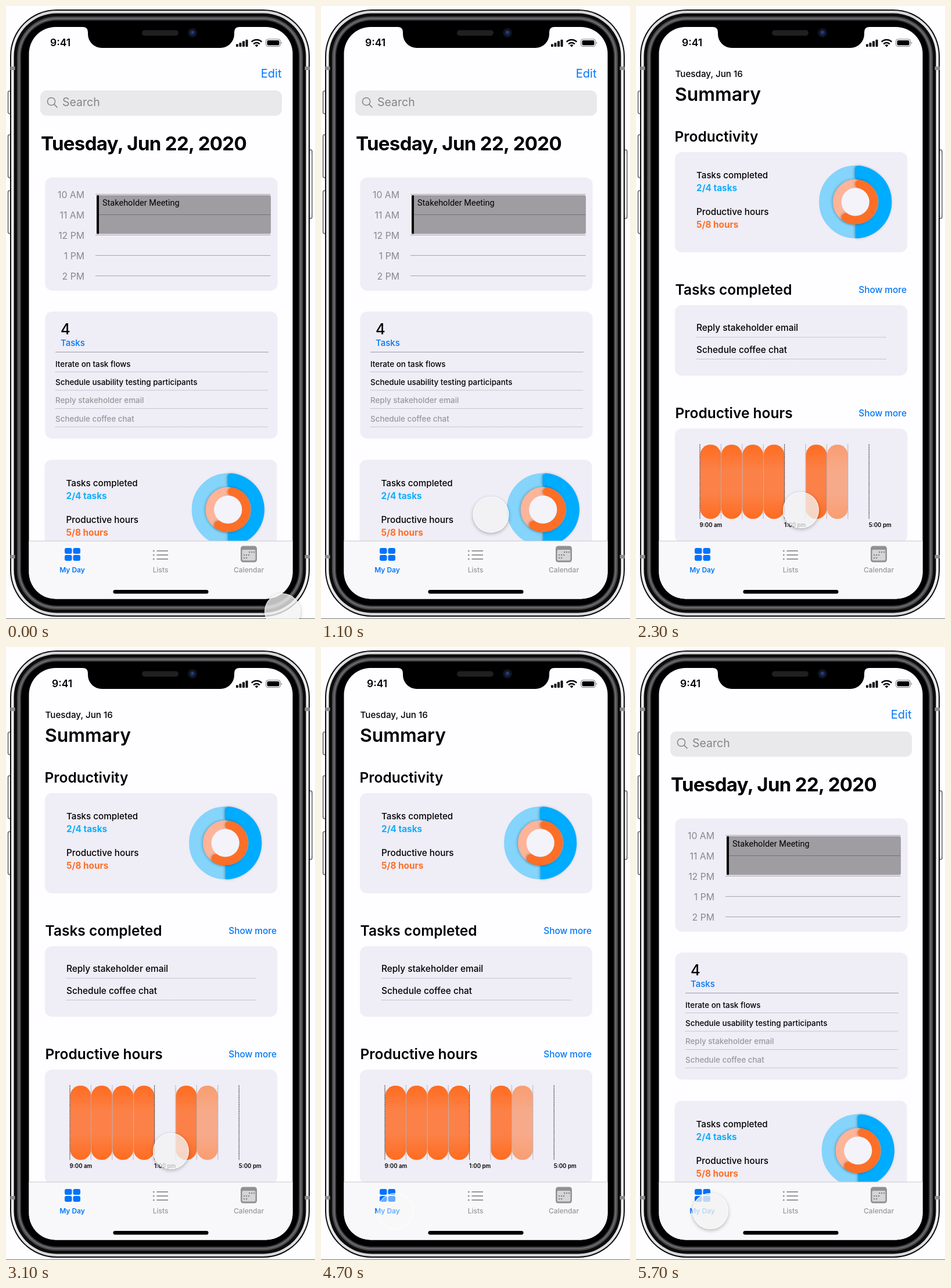
An HTML page for the animation above (5800 ms loop, 532x1053 px).

```html
<!DOCTYPE html>
<html lang="en">
<head>
<meta charset="utf-8">
<title>My Day</title>
<style>
  html, body { margin: 0; width: 100%; height: 100%; overflow: hidden; background: #fefdff; }
  svg { display: block; position: absolute; left: 0; top: 0; }
  text { font-family: Inter, sans-serif; white-space: pre; }
  .raised { filter: drop-shadow(-1px 0 2px rgba(0, 0, 0, .28)); }
  #touch {
    position: absolute; left: -31px; top: -31px; width: 62px; height: 62px;
    box-sizing: border-box; border: 1.5px solid rgba(255, 255, 255, .8); border-radius: 50%;
  }
</style>
</head>
<body>
<svg id="stage" width="532" height="1053" viewBox="0 0 532 1053"></svg>
<div id="touch"></div>
<script>
const BLUE = '#0077f8', GREY = '#98989b', CARD = '#efedf6', SKY = '#12aefb', ORANGE = '#fd6f27';

const text = (x, y, str, size, weight = 500, fill = '#000', anchor = 'start', extra = '') =>
  `<text x="${x}" y="${y}" font-size="${size}" font-weight="${weight}" fill="${fill}" text-anchor="${anchor}" ${extra}>${str}</text>`;
const rect = (x, y, w, h, r, fill, extra = '') =>
  `<rect x="${x}" y="${y}" width="${w}" height="${h}" rx="${r}" fill="${fill}" ${extra}/>`;
const line = (x1, y1, x2, y2, stroke, width = 1, dash = 'none') =>
  `<path d="M${x1} ${y1}L${x2} ${y2}" stroke="${stroke}" stroke-width="${width}" stroke-dasharray="${dash}"/>`;
const circle = (x, y, r, fill, extra = '') =>
  `<circle cx="${x}" cy="${y}" r="${r}" fill="${fill}" ${extra}/>`;
const repeat = (items, draw) => items.map(draw).join('');
const dotted = (x1, x2, y) => line(x1, y, x2, y, '#a3a2a8', 1, '1.2 1');

// Phone body: nested rounded outlines, from the steel rim to the black bezel
const ring = (inset, fill) =>
  rect(7 + inset, 6 + inset, 516 - 2 * inset, 1043 - 2 * inset, 80 - inset, fill);
const sideButton = (x, y, h) => rect(x, y, 6, h, 2, 'url(#steel)', 'stroke="#222" stroke-width="1"');

const phone = `
  ${line(0, 1052.5, 532, 1052.5, '#777')}
  ${sideButton(3.5, 146, 39)}${sideButton(3.5, 221, 74)}${sideButton(3.5, 317, 74)}${sideButton(521, 247, 118)}
  ${ring(0, '#0c0c0d')}${ring(2, 'url(#steel)')}${ring(6.5, '#0c0c0d')}
  ${ring(12, '#4a4a4d')}${ring(14.5, '#6a6a6e')}${ring(17, '#3a3a3c')}${ring(19, '#000')}
  ${repeat([104, 943], y => rect(7.5, y, 8, 6, 0, '#8f8f92') + rect(514.5, y, 8, 6, 0, '#8f8f92'))}`;

const statusIcons = `
  ${repeat([0, 1, 2, 3], i => rect(396 + i * 5.5, 65.5 - i * 2.6, 4, 4.5 + i * 2.6, 1, '#000'))}
  <g fill="none" stroke="#000" stroke-width="2.6">
    <path d="M422.8 61.6A12.4 12.4 0 0 1 440.2 61.6"/><path d="M426.2 65.3A7.4 7.4 0 0 1 436.8 65.3"/>
  </g>
  <path d="M431.5 70.5L428.6 67.6A4.2 4.2 0 0 1 434.4 67.6Z"/>
  ${rect(447.5, 57, 25, 12.5, 3.6, 'none', 'stroke="#777"')}${rect(449.5, 59, 21, 8.5, 2, '#000')}
  <path d="M474 61.3Q476.4 63.2 474 65.2Z" fill="#777"/>`;

const notch = `
  <path d="M132 35H402V36Q393 36 393 45V48A24 24 0 0 1 369 72H165A24 24 0 0 1 141 48V45Q141 36 132 36Z"/>
  ${rect(234, 41.5, 63, 9.5, 4.7, '#202022')}
  ${circle(321, 46, 8, '#10131f')}${circle(321, 46, 4.5, '#182850')}${circle(321, 45, 1.8, '#2d4f92')}`;

const tabBar = `
  ${rect(39, 919, 455, 100, 0, '#f8f8fa')}${line(39, 919, 494, 919, '#c9c9cd')}
  ${repeat([0, 1, 2, 3], i => rect(101 + (i % 2) * 14.5, 931 + (i >> 1) * 12, 12.5, 10, 3, '#0073fc'))}
  ${repeat([936, 943, 950], y => circle(254.3, y, 1.5, GREY) + line(259.5, y, 279, y, GREY, 2))}
  ${rect(404, 927.5, 28, 28, 4.5, '#919194')}${rect(406.5, 934, 23, 18.5, 2, '#d5d5d7')}
  ${repeat([[418, 938], [422, 938], [426, 938], [409, 943], [413, 943], [417, 943], [409, 948], [413, 948]],
    ([x, y]) => rect(x, y - 1, 2.2, 2.2, 0, '#858588'))}
  ${text(114, 973, 'My Day', 12, 600, BLUE, 'middle')}
  ${text(266, 973, 'Lists', 12, 500, GREY, 'middle')}
  ${text(418, 973, 'Calendar', 12.1, 500, GREY, 'middle')}
  ${rect(184.5, 1003, 164, 6.4, 3.2, '#000')}`;

// Card with progress figures and two nested rings
const progressCard = (x, y, ringX) => `
  <g transform="translate(${x} ${y})">
    ${rect(0, 0, 400, 172, 12, CARD)}
    ${text(37, 45, 'Tasks completed', 15.2)}
    ${text(37, 67, '2/4 tasks', 15.3, 700, SKY)}
    ${text(37, 108, 'Productive hours', 15.3)}
    ${text(37, 130, '5/8 hours', 15.3, 700, ORANGE)}
    <g transform="translate(${ringX} 85.5)" fill="none">
      <circle r="50.3" stroke="#84d4fb" stroke-width="24.6"/>
      <path class="raised" fill="#00acff" d="M6 -62.3A62.6 62.6 0 0 1 0 62.6V38A38 38 0 0 0 5 -38Q-1 -38 -1 -44V-56.3Q-1 -62.3 6 -62.3Z"/>
      <g class="raised"><circle r="31.4" stroke="#fdb498" stroke-width="14.6"/></g>
      <path class="raised" d="M7.1 -30.6A31.4 31.4 0 1 1 -16.7 26.6" stroke="${ORANGE}" stroke-width="14.6" stroke-linecap="round"/>
      <circle r="24" fill="#f4f3fa"/>
    </g>
  </g>`;

const hours = ['10 AM', '11 AM', '12 PM', '1 PM', '2 PM'];
const tasks = ['Iterate on task flows', 'Schedule usability testing participants',
  'Reply stakeholder email', 'Schedule coffee chat'];

const home = `
  ${text(76, 69, '9:41', 17.5, 600)}
  ${text(474.5, 122.5, 'Edit', 20, 400, BLUE, 'end')}
  ${rect(59, 145, 416, 43.5, 11, '#e9e8ea')}
  ${circle(78, 164, 6.6, 'none', 'stroke="#848488" stroke-width="1.5"')}${line(82.8, 168.8, 88.5, 174.5, '#848488', 1.7)}
  ${text(97, 172, 'Search', 19.5, 400, '#848488')}
  ${text(60, 247.5, 'Tuesday, Jun 22, 2020', 33, 700, '#000', 'start', 'letter-spacing="-.65"')}

  ${rect(67.5, 294.5, 400, 194.5, 12, CARD)}
  ${repeat(hours, (label, i) => text(135, 330 + i * 35.1, label, 15.8, 400, '#88878c', 'end'))}
  ${rect(156, 325, 300, 66.5, 3, '#9f9ca2')}${rect(156, 325, 4, 66.5, 1.5, '#000')}
  ${repeat(hours, (_, i) => line(i === 1 ? 160 : 154, 323.5 + i * 35, 455.5, 323.5 + i * 35, i === 1 ? '#737177' : '#a6a5aa'))}
  ${text(166, 343, 'Stakeholder Meeting', 14.5, 400, '#000', 'start', 'style="font-family:Roboto,sans-serif"')}

  ${rect(67.5, 525, 400, 218, 12, CARD)}
  ${text(94, 563.5, '4', 25.5, 500)}
  ${text(94, 584, 'Tasks', 15, 500, BLUE)}
  ${line(85, 594.5, 452, 594.5, '#9c9ba0')}
  ${repeat(tasks, (task, i) => text(85, 619.5 + i * 31.4, task, 13.4, 500, i < 2 ? '#000' : GREY)
    + dotted(85, 451, 628.5 + i * 31.5))}

  ${progressCard(66.5, 779.5, 315.8)}`;

const heading = (x, y, str) => text(x, y, str, 24.5, 600);
const showMore = y => text(466, y, 'Show more', 15.4, 500, BLUE, 'end');
const column = i => 110 + i * 36.4;

const summary = `
  ${text(79, 69, '9:41', 17.5, 600)}
  ${text(67.5, 121.5, 'Tuesday, Jun 16', 15.2)}
  ${text(67, 163, 'Summary', 31.9, 600)}
  ${heading(66.5, 232.5, 'Productivity')}
  ${progressCard(67, 251, 310.7)}

  ${heading(67.5, 496, 'Tasks completed')}${showMore(493)}
  ${rect(67, 514, 400, 121, 12, CARD)}
  ${repeat(tasks.slice(2), (task, i) => text(104, 558 + i * 37.7, task, 15.4) + dotted(104, 431, 569 + i * 37.5))}

  ${heading(67.5, 707.5, 'Productive hours')}${showMore(705)}
  ${rect(67, 726, 400, 196, 12, CARD)}
  ${repeat([0, 1, 2, 3, 5, 6], i => rect(column(i) + .5, 753.5, 35.8, 127.5, 17.5, 'url(#bar)', i === 6 ? 'opacity=".62"' : ''))}
  ${repeat([0, 1, 2, 3, 4, 5, 6, 7, 8], i =>
    line(column(i), 753, column(i), 881, i % 4 ? '#8f8e94' : '#000', 1.2, '1.2 1.2'))}
  ${repeat(['9:00 am', '1:00 pm', '5:00 pm'], (label, i) => text(109.5 + i * 145.6, 895, label, 9.7, 600))}`;

document.getElementById('stage').innerHTML = `
  <defs>
    <linearGradient id="steel" x2="0" y2="1">
      <stop stop-color="#d6d6d9"/><stop offset=".08" stop-color="#f5f5f6"/>
      <stop offset=".92" stop-color="#f5f5f6"/><stop offset="1" stop-color="#d6d6d9"/>
    </linearGradient>
    <linearGradient id="bar" x2="0" y2="1">
      <stop stop-color="#fe6c20"/><stop offset=".35" stop-color="#fc8148"/>
      <stop offset=".65" stop-color="#fc8148"/><stop offset="1" stop-color="#fe6c20"/>
    </linearGradient>
    <clipPath id="screen">${rect(39.5, 36, 454, 982.5, 46, '#fff')}</clipPath>
  </defs>
  ${phone}
  <g clip-path="url(#screen)">
    ${rect(39, 35, 456, 985, 0, '#fefdff')}
    <g id="home">${home}</g>
    <g id="summary">${summary}</g>
    ${statusIcons}${tabBar}
  </g>
  ${notch}`;

const homeView = document.getElementById('home');
const summaryView = document.getElementById('summary');
const touch = document.getElementById('touch');

const LOOP = 5800, OPEN = 2300, CLOSE = 4800;
const clamp = v => Math.min(1, Math.max(0, v));
const ease = u => u < .5 ? 2 * u * u : 1 - 2 * (1 - u) ** 2;
const progress = (t, start, length) => ease(clamp((t - start) / length));
const curve = (a, b, c, u) => a * (1 - u) ** 2 + 2 * b * u * (1 - u) + c * u * u;

// 1 while the finger is down, just before a screen change
const pressAt = (t, change) => Math.min(clamp((t - change + 280) / 160), clamp((change - t) / 50));

function touchPosition(t) {
  if (t < OPEN) {
    const u = progress(t, 250, 1000);
    return [476 - 192 * u, 1040 - 174 * u];
  }
  const u = progress(t, 3100, 1000);
  return [curve(284, 218, 128, u), curve(866, 842, 969, u)];
}

function draw() {
  const t = performance.now() % LOOP;
  const showSummary = t >= OPEN && t < CLOSE;
  homeView.style.display = showSummary ? 'none' : '';
  summaryView.style.display = showSummary ? '' : 'none';

  const press = Math.max(pressAt(t, OPEN), pressAt(t, CLOSE));
  const [x, y] = touchPosition(t);
  const tone = 243 + 5 * press;
  touch.style.transform = `translate(${x}px, ${y}px)`;
  touch.style.background = `rgba(${tone}, ${tone}, ${tone}, ${.78 - .36 * press})`;
  touch.style.boxShadow = `0 2px 6px rgba(0, 0, 0, ${.28 * (1 - press)})`;
  requestAnimationFrame(draw);
}
draw();
</script>
</body>
</html>
```
